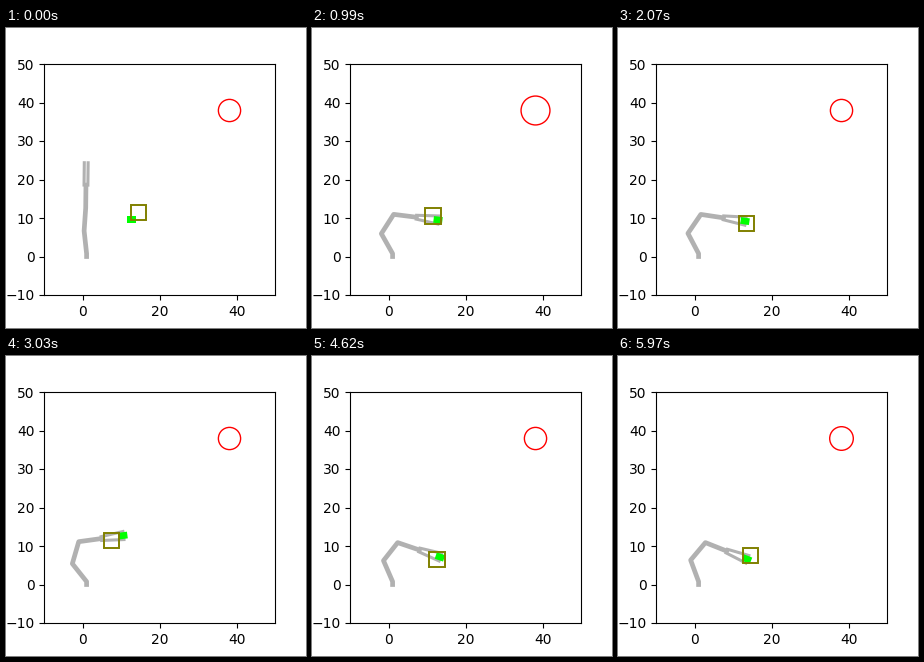
Animation, 300 px wide and 300 px high, one loop 6 s. Source, as a matplotlib script:

```python
import numpy as np
import matplotlib.pyplot as plt
from matplotlib.animation import FuncAnimation
from matplotlib.patches import Rectangle

FRAMES, STEP_MS = 200, 30
FOOT, SHOULDER = np.array([1, 0]), np.array([1, 0.75])
LINK, FINGER, REACH = 5.95, 5.8, 11.6
GRASP = 32
GREY = "0.695"

# step, grip point x and y, lower left cell of the goal
WAYPOINTS = np.array([
    (0, 0.9, 24.2, 12, 9),
    (21, 9.2, 16.5, 9, 8),
    (GRASP, 12.7, 9.65, 9, 8),
    (48, 14.15, 7.3, 10, 7),
    (69, 13.05, 9.2, 11, 6),
    (88, 9.4, 15.5, 5, 9),
    (101, 10.45, 12.7, 5, 9),
    (154, 13.3, 7.15, 10, 4),
    (199, 13.55, 6.6, 12, 5),
])
STEPS = WAYPOINTS[:, 0]
SWITCHES = (STEPS[1:] + STEPS[:-1]) / 2


def direction(angle):
    return np.array([np.cos(angle), np.sin(angle)])


def grip_at(i):
    return np.array([np.interp(i, STEPS, WAYPOINTS[:, k]) for k in (1, 2)])


def pitch_at(height):
    """The hand tilts up with height, steeper far from level."""
    d = height - 11.03
    return np.radians(4.65 * d + 0.0123 * d**3)


def solve_arm(grip, pitch):
    """Two-link inverse kinematics, elbow on the left."""
    joint = grip - REACH * direction(pitch)
    dx, dy = joint - SHOULDER
    bend = np.arccos(min(1, np.hypot(dx, dy) / (2 * LINK)))
    aim = np.arctan2(dy, dx)
    pts = [FOOT, SHOULDER]
    for angle in (aim + bend, aim - bend, pitch):
        pts.append(pts[-1] + LINK * direction(angle))
    return np.array(pts)


def ring_size(i):
    contact = max(0, np.cos(2 * np.pi * (i - 48) / 75.5))
    squeeze = 7 * np.exp(-((i - GRASP) / 1.5) ** 2)
    return 16 + contact * (i > 21) + squeeze


fig, ax = plt.subplots(figsize=(3, 3), dpi=100)
ax.set(xlim=(-10, 50), ylim=(-10, 50), aspect="equal",
       xticks=(0, 20, 40), yticks=range(-10, 51, 10))

arm, = ax.plot([], [], color=GREY, lw=3.4)
fingers = [ax.plot([], [], color=GREY, lw=2.2)[0] for _ in range(2)]
block = ax.add_patch(Rectangle((0, 0), 2.3, 1.75, rotation_point="center",
                               color="lime", lw=0, zorder=4))
goal = ax.add_patch(Rectangle((0, 0), 4, 4, fill=False, ec="olive",
                              lw=1.4, zorder=5))
ring, = ax.plot(38, 38, "o", mfc="none", mec="red", mew=1)


def draw(i):
    grip = grip_at(i)
    pitch = pitch_at(grip[1])
    pts = solve_arm(grip, pitch)
    arm.set_data(pts.T)

    opening = np.radians(5.5) * np.clip((i - 21) / 8, 0, 1)
    for line, side in zip(fingers, (1, -1)):
        root = pts[-1] + side * 0.5 * direction(pitch + np.pi / 2)
        tip = root + FINGER * direction(pitch + side * opening)
        line.set_data(np.array([root, tip]).T)

    held = i >= GRASP
    block.set_xy((grip if held else grip_at(GRASP)) - (1.15, 0.875))
    block.set_angle(np.degrees(pitch) if held else 0)

    cell = WAYPOINTS[np.searchsorted(SWITCHES, i), 3:]
    goal.set_xy(cell + 0.5)
    ring.set_markersize(ring_size(i))
    return arm, *fingers, block, goal, ring


anim = FuncAnimation(fig, draw, frames=FRAMES, init_func=lambda: draw(0),
                     interval=STEP_MS, repeat=True, repeat_delay=0)
plt.show()
```
